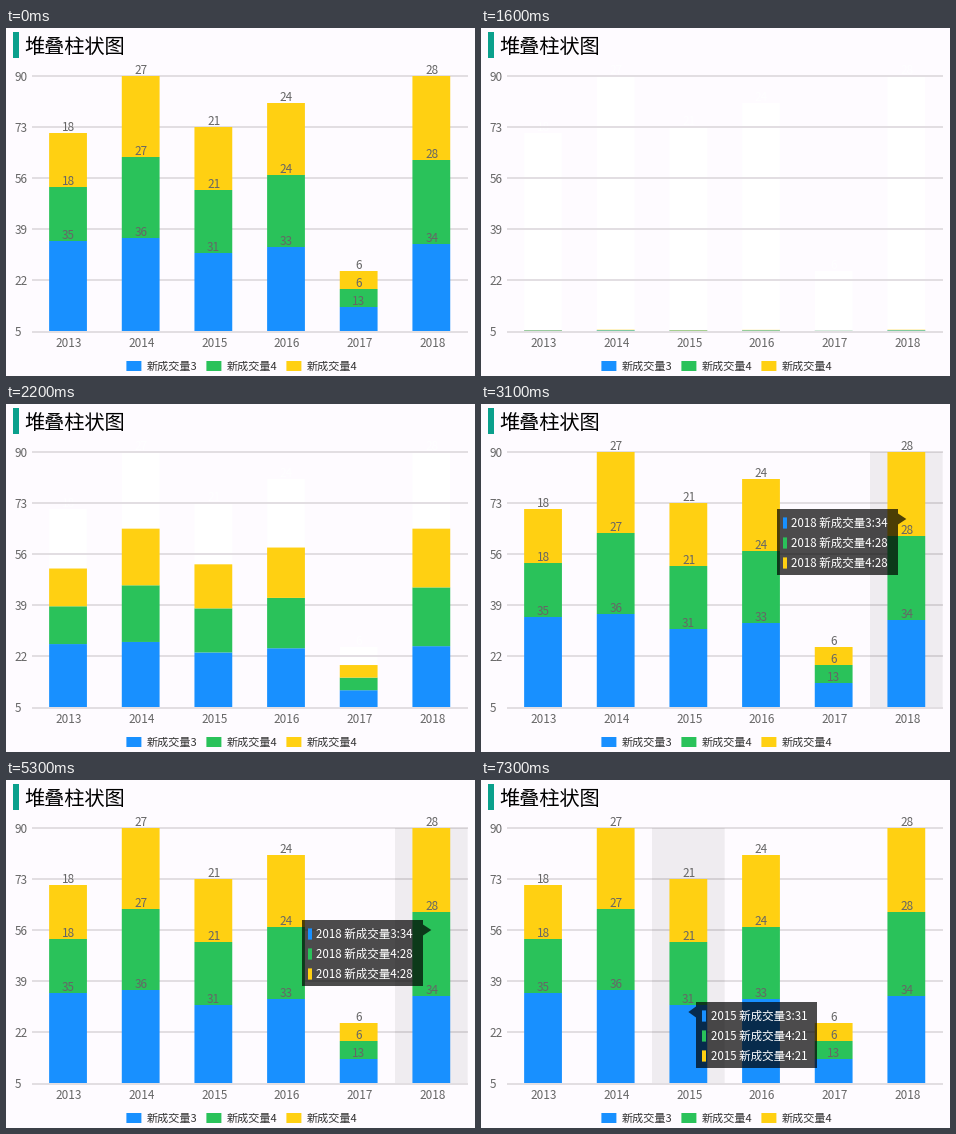
Recreate the animation shown at these times as a matplotlib script. Size 469 by 348 pixels, loop 8.4 s.

```python
import matplotlib.pyplot as plt
from matplotlib.animation import FuncAnimation
from matplotlib.patches import Polygon, Rectangle

W, H, DPI = 469, 348, 100
STEP, LOOP = 100, 8400

plt.rcParams["font.family"] = ["Noto Sans CJK JP"]
plt.rcParams["toolbar"] = "None"

BACK, GRID, TEAL, GREY = "#fefbff", "#e2dee2", "#0aa08c", "#666666"
COLORS = ["#1890ff", "#2ac25a", "#ffd012"]
NAMES = ["新成交量3", "新成交量4", "新成交量4"]
YEARS = range(2013, 2019)
DATA = [(35, 18, 18), (36, 27, 27), (31, 21, 21),
        (33, 24, 24), (13, 6, 6), (34, 28, 28)]

LEFT, TOP, BASE = 25.7, 48, 303
COLUMN, BAR = 72.66, 37.8
UNIT = 3          # pixels per value
Y_MIN = 5

# (start ms, column, tooltip top)
HOVERS = [(3100, 5, 105), (4000, 2, 102), (4600, 3, 120), (5300, 5, 140),
          (5900, 4, 180), (6700, 1, 205), (7300, 2, 222)]

fig = plt.figure(figsize=(W / DPI, H / DPI), dpi=DPI, facecolor=BACK)
ax = fig.add_axes([0, 0, 1, 1])


def on_top():
    return len(ax.patches) + len(ax.texts) + 1


def shape(patch):
    patch.set(linewidth=0, snap=False, zorder=on_top())
    ax.add_patch(patch)


def rect(x, y, w, h, color, alpha=1):
    shape(Rectangle((x, y), w, h, fc=color, alpha=alpha))


def text(x, y, s, size, color, ha="left"):
    ax.text(x, y, s, fontsize=size * 72 / DPI, color=color, ha=ha,
            va="baseline", zorder=on_top())


def center(i):
    return LEFT + COLUMN * (i + 0.5)


def ease_in_out(t):
    return 4 * t ** 3 if t < 0.5 else 1 - 4 * (1 - t) ** 3


def title(tint=None):
    rect(7, 4, 6, 26, tint or TEAL)
    text(17.9, 24.7, "堆叠柱状图", 20.2, tint or "black")


def grid(tint=None):
    for k in range(6):
        y = TOP - 1 + 51 * k + (k == 5)
        rect(26, y, 436, 2, tint or GRID)
        text(8.5, 53.3 + 51 * k, str(90 - 17 * k), 11.7, tint or GREY)
    for i, year in enumerate(YEARS):
        text(center(i) + 0.9, 319, str(year), 11.7, tint or GREY, "center")


def legend(tint=None):
    for k, name in enumerate(NAMES):
        rect(120.4 + 80 * k, 333, 15, 10, tint or COLORS[k])
        text(140.3 + 80 * k, 342.3, name, 11.1, tint or "#333333")


def bars(progress=1, labels=True, tint=None):
    for i, values in enumerate(DATA):
        y, tops = BASE, []
        for k, value in enumerate(values):
            h = (value - (Y_MIN if k == 0 else 0)) * UNIT * progress
            y -= h
            tops.append(y)
            rect(center(i) - BAR / 2, y, BAR, h, tint or COLORS[k])
        if labels:
            for y, value in zip(tops, values):
                text(center(i) + 0.3, y - 1.9, str(value), 11.7, tint or GREY, "center")


def tooltip(i, y):
    w, h, arrow = 121, 66, 8
    tip = center(i)
    on_right = tip + arrow + w < W - 20
    x = round(tip + arrow if on_right else tip - arrow - w)
    edge = x if on_right else x + w
    rect(x, y, w, h, "black", 0.7)
    shape(Polygon([(edge, y + 4.5), (tip, y + 10), (edge, y + 15.5)],
                  fc="black", alpha=0.7))
    for k, (name, value) in enumerate(zip(NAMES, DATA[i])):
        rect(x + 6, y + 8.4, 4, 11.2, COLORS[k])
        text(x + 14.5, y + 18.3, f"{YEARS[i]} {name}:{value}", 11.5, "white")
        y += 20


def draw(frame):
    t = frame * STEP
    ax.clear()
    ax.set(xlim=(0, W), ylim=(H, 0))
    ax.axis("off")

    # The wiped chart leaves a faint white trace until it has regrown.
    if 900 <= t < 2400:
        bars(tint="white")
        if t < 1500:
            grid("white")
            legend("white")
        if t < 1300:
            title("white")
            return
    title()
    if 900 <= t < 1500:
        return

    grid()
    legend()
    if 1500 <= t < 2400:
        step = min((t - 1500) // 100, 7)
        bars(ease_in_out(0.0285 + 0.0785 * step), labels=False)
        return

    hover = next((h for h in reversed(HOVERS) if t >= h[0]), None)
    if hover:
        rect(LEFT + COLUMN * hover[1], TOP, COLUMN, BASE - TOP, "black", 0.06)
    bars()
    if hover:
        tooltip(*hover[1:])


anim = FuncAnimation(fig, draw, frames=LOOP // STEP, init_func=lambda: None,
                     interval=STEP, repeat=True, repeat_delay=0)
plt.show()
```
